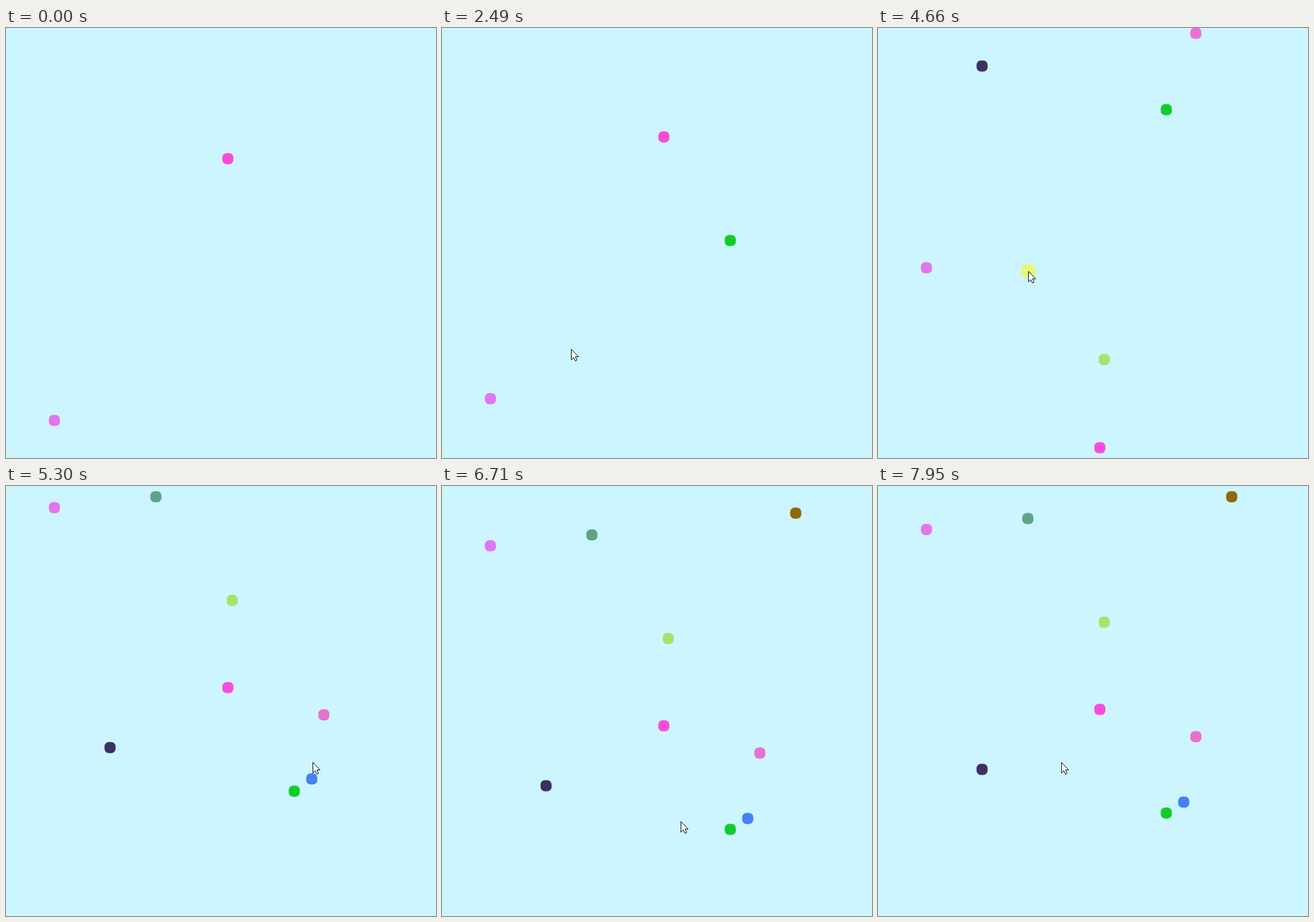
Recreate the animation shown at these times as an HTML page. Size 690 by 690 pixels, loop 8000 ms.

```html
<!DOCTYPE html>
<html lang="en">
<head>
<meta charset="utf-8">
<title>Falling dots</title>
<style>
  html, body { margin: 0; width: 100%; height: 100%; overflow: hidden; background: #cdf5ff; }
  svg { display: block; width: 100%; height: 100%; }
</style>
</head>
<body>
<svg id="stage" viewBox="0 0 690 690">
  <g id="dots" stroke-opacity=".4"></g>
  <circle id="press" r="12" fill="#e6f77f"/>
  <path id="cursor" d="M.5 .5V17.5L4.3 13.8L6.9 19.3L9.5 18.1L7 12.6H12Z" fill="#fff" stroke="#000" stroke-linejoin="round"/>
</svg>
<script>
const LOOP = 8000, FRAME = 46.3, STEP = 8.75, ROWS = 81, SIZE = 17.4;

// Each dot falls from the place and frame of its click.
const DOTS = [
  { x: 356, y: 210, born: 0, fill: '#fa4bdb' },
  { x: 77.7, y: 630, born: 0, fill: '#e076f0' },
  { x: 462.6, y: 269, born: 24, fill: '#12cc2a' },
  { x: 167, y: 549, born: 65, fill: '#3b3163' },
  { x: 510, y: 427, born: 90, fill: '#e970d0' },
  { x: 363, y: 401, born: 96, fill: '#a6e36b' },
  { x: 240.5, y: 390, born: 102, fill: '#5da486' },
  { x: 490.6, y: 444, born: 114, fill: '#4680f2' },
  { x: 567.6, y: 392, born: 131, fill: '#8f690a' }
];

// Frame and rows fallen by then; the rate varies a little.
const FALL = [[0, 0], [30, 86], [54, 158], [145, 425], [172, 503]];

// Frame, x, y of the mouse between clicks; it rests while pressing.
const HOLD = 2;
const clicks = DOTS.filter(d => d.born);
const path = [
  [20, 470, 0], [30, 371, 464], [54, 207, 515], [75, 253, 585],
  [128, 569, 362], [145, 383, 538], [172, 294, 443],
  ...clicks.flatMap(d => [[d.born - HOLD, d.x, d.y], [d.born, d.x, d.y]])
].sort((a, b) => a[0] - b[0]);

const $ = id => document.getElementById(id);
const linear = u => u;
const smooth = u => u * u * (3 - 2 * u);

function sample(keys, at, col, ease) {
  let i = 0;
  while (i < keys.length - 2 && keys[i + 1][0] <= at) i++;
  const a = keys[i], b = keys[i + 1];
  const u = Math.min(1, Math.max(0, (at - a[0]) / (b[0] - a[0])));
  return a[col] + (b[col] - a[col]) * ease(u);
}

const frameAt = t => Math.max(0, Math.floor((t - 30) / FRAME + 1.2));
const fallen = frame => Math.floor(sample(FALL, frame, 1, linear) + 0.2);

// A dot snaps to the row grid once it has wrapped to the top.
function heightAt({ y, born }, frame) {
  const drop = fallen(frame) - fallen(born);
  const row = Math.ceil(y / STEP) + drop;
  return row < ROWS ? y + drop * STEP : (row % ROWS) * STEP;
}

const nodes = DOTS.map(({ x, fill }) => {
  const node = document.createElementNS('http://www.w3.org/2000/svg', 'rect');
  const attrs = { x: x - SIZE / 2, width: SIZE, height: SIZE, rx: 6.8, fill, stroke: fill };
  for (const name in attrs) node.setAttribute(name, attrs[name]);
  return $('dots').appendChild(node);
});

const show = (node, on) => node.setAttribute('visibility', on ? 'visible' : 'hidden');

function render(t) {
  const frame = frameAt(t);

  DOTS.forEach((dot, i) => {
    nodes[i].setAttribute('y', heightAt(dot, frame) - SIZE / 2 - 0.25);
    show(nodes[i], frame >= dot.born);
  });

  const [x, y] = [1, 2].map(col => Math.round(sample(path, frame, col, smooth)));
  for (const id of ['press', 'cursor']) $(id).setAttribute('transform', `translate(${x} ${y})`);
  show($('cursor'), frame >= path[0][0]);
  show($('press'), clicks.some(d => frame >= d.born - HOLD && frame < d.born));
}

const began = performance.now();
function loop() {
  render((performance.now() - began) % LOOP);
  requestAnimationFrame(loop);
}
render(0);
requestAnimationFrame(loop);
</script>
</body>
</html>
```
